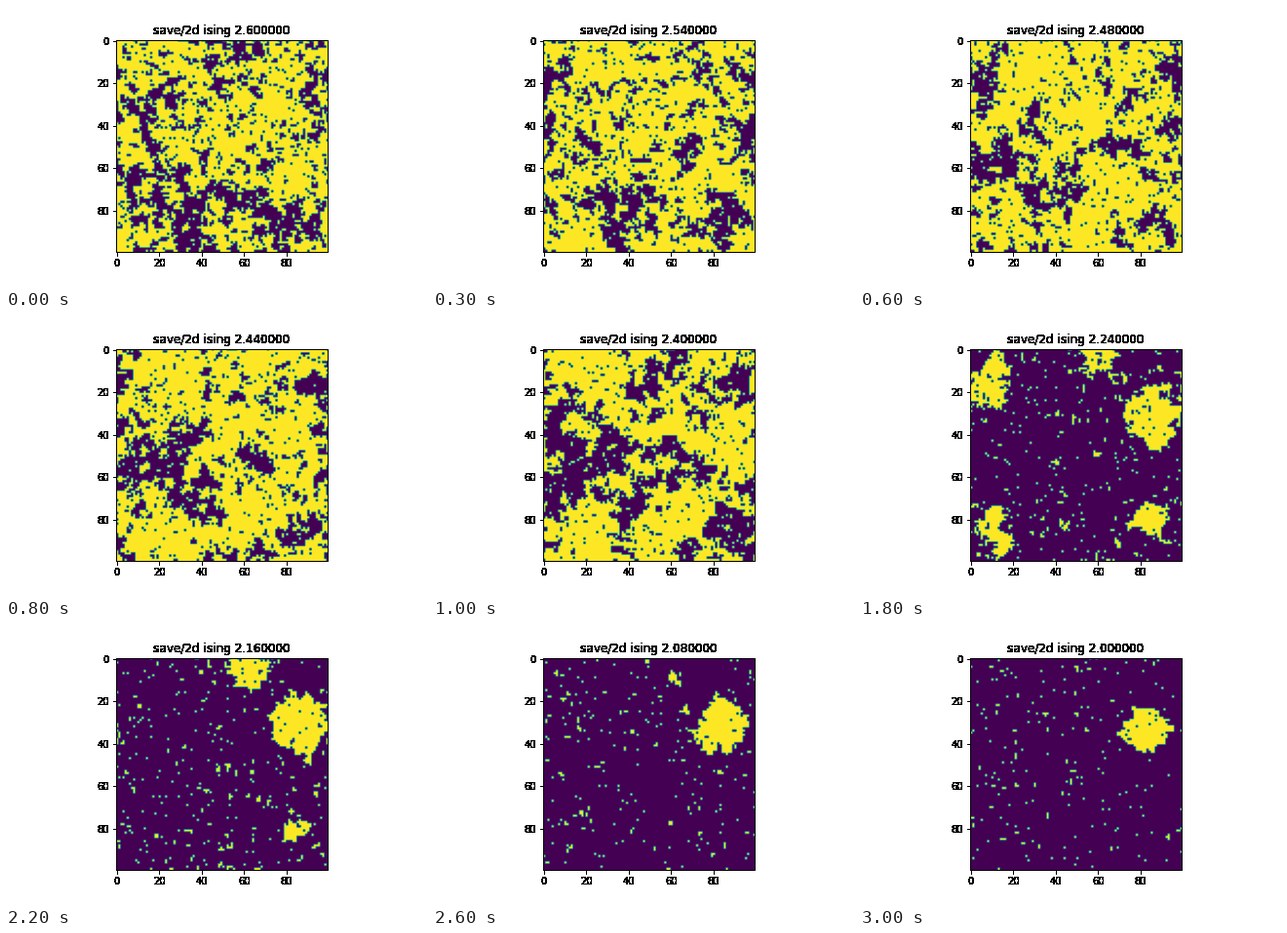
A matplotlib script that plays this animation: 432 px wide and 288 px high, repeating every 3.1 s.

```python
import numpy as np
import matplotlib.pyplot as plt
from matplotlib.animation import FuncAnimation

SIZE = 100
STEPS = 31
SWEEPS = 10

yy, xx = np.mgrid[:SIZE, :SIZE]
checker = (xx + yy) % 2
rng = np.random.default_rng(7)

# Passing up-spin domains: centre x, centre y, radius, step of greatest pull
passing = [(72, 34, 12, 0), (85, 61, 11, 0),
           (28, 12, 15, 6), (55, 35, 13, 6), (75, 73, 9, 6),
           (62, 79, 14, 10), (20, 88, 12, 10), (85, 48, 11, 11),
           (4, 16, 14, 14), (10, 86, 12, 14),
           (61, 6, 11, 19), (86, 79, 10, 18)]


def disc(cx, cy, radius):
    """Soft-edged disc, 1 inside and 0 outside."""
    dist2 = (xx - cx) ** 2 + (yy - cy) ** 2
    return np.clip(3 * (1 - dist2 / radius ** 2), 0, 1)


def temperature(step):
    return 2.6 - 0.02 * step


def field_at(step):
    pull = sum(disc(cx, cy, r) * np.exp(-((step - peak) / 3.5) ** 2)
               for cx, cy, r, peak in passing)
    # The last domain to survive drifts and shrinks
    age = np.clip((step - 14) / 16, 0, 1)
    last = disc(88 - 6 * age, 29 + 5 * age, 17 - 6 * age)
    pull = np.clip(pull + last * min(1, 4 * age), 0, 1)
    background = np.interp(step, [0, 7, 18], [0.02, 0, -0.2])
    return background + (0.35 - background) * pull


def sweep(spins, field, temp):
    """One heat-bath update of both sublattices."""
    for parity in (0, 1):
        near = sum(np.roll(spins, s, axis) for s in (-1, 1) for axis in (0, 1))
        p_up = 1 / (1 + np.exp(-2 * (near + field) / temp))
        fresh = np.where(rng.random(spins.shape) < p_up, 1.0, -1.0)
        spins = np.where(checker == parity, fresh, spins)
    return spins


def simulate():
    spins = rng.choice([-1.0, 1.0], (SIZE, SIZE))
    states = []
    for step in range(STEPS):
        field = field_at(step)
        for _ in range(SWEEPS if step else 3 * SWEEPS):
            spins = sweep(spins, field, temperature(step))
        states.append(spins)
    return states


def harden(rgba, dpi):
    """Turn every touched pixel fully opaque."""
    rgba = rgba.copy()
    rgba[..., 3] = rgba[..., 3] > 0.02
    return rgba, 0, 0


states = simulate()

plt.rcParams["font.family"] = "DejaVu Sans"
fig, ax = plt.subplots(figsize=(6, 4), dpi=72, facecolor="white")
fig.subplots_adjust(left=0.125, right=0.9, bottom=0.125, top=0.88)
image = ax.imshow(states[0], vmin=-1, vmax=1, cmap="viridis")
ax.set_xticks(range(0, SIZE, 20))
ax.set_yticks(range(0, SIZE, 20))
title = ax.set_title("", fontsize=12, pad=6)
for part in (title, ax.xaxis, ax.yaxis, *ax.spines.values()):
    part.set_agg_filter(harden)


def draw(step):
    image.set_data(states[step])
    title.set_text(f"save/2d ising {temperature(step):.6f}")
    return image, title


anim = FuncAnimation(fig, draw, frames=STEPS, interval=100, repeat=True,
                     repeat_delay=0, blit=False)
plt.show()
```
